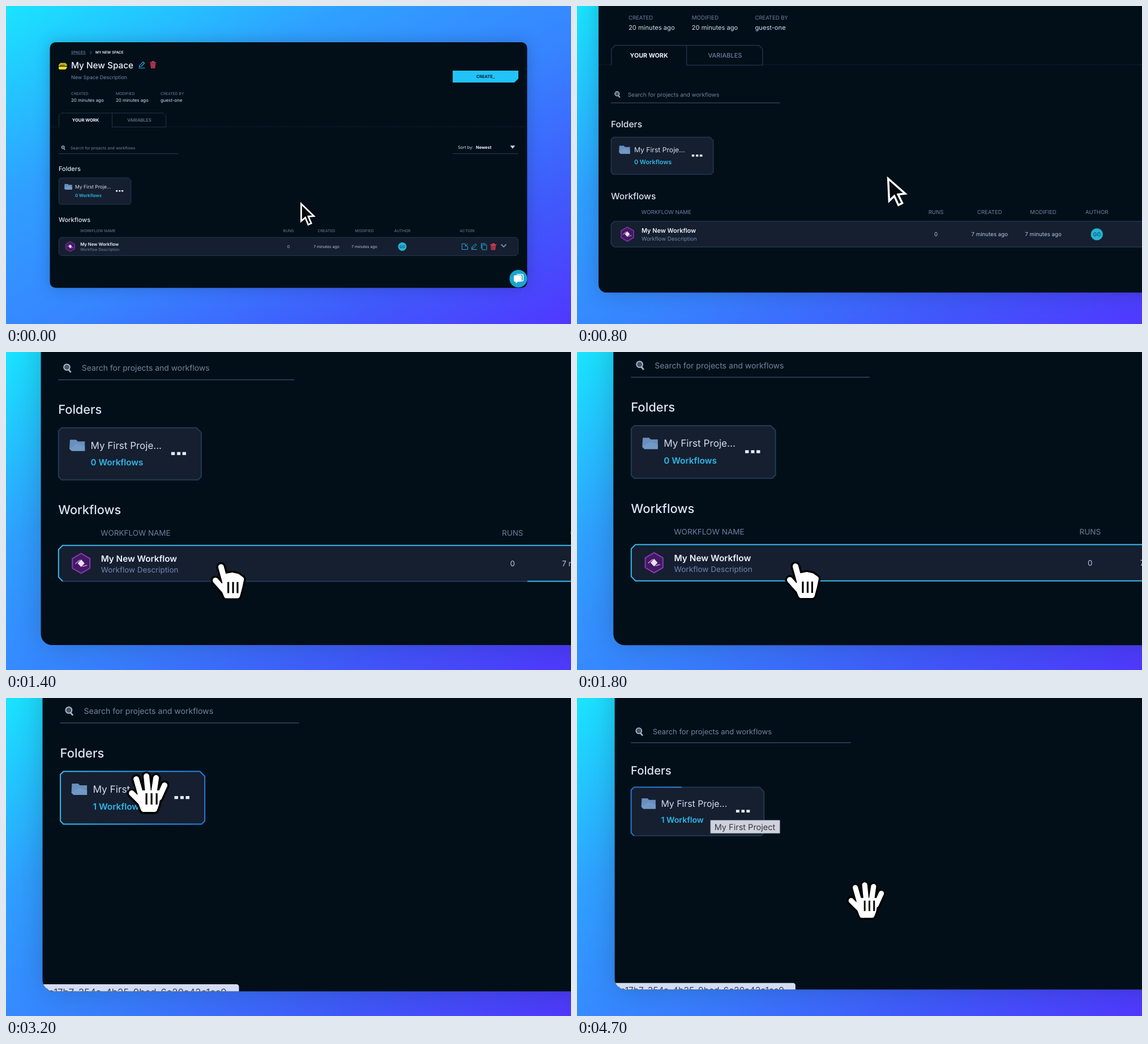
Write an HTML page that moves like this. It is 998x561 px and loops after 4800 ms.

```html
<!DOCTYPE html>
<html lang="en">
<head>
<meta charset="utf-8">
<title>Move a workflow into a folder</title>
<style>
  html, body { margin: 0; width: 100%; height: 100%; overflow: hidden; background: #3784ff; }
  svg { display: block; width: 100%; height: 100%; }
  text { font-family: Inter, "Open Sans", sans-serif; text-rendering: geometricPrecision; }
  .line { fill: none; stroke-linecap: round; stroke-linejoin: round; }
  .hand path { fill: #fff; stroke: #fff; stroke-width: 10; stroke-linecap: round; stroke-linejoin: round; }
  .hand path.rim { fill: #000; stroke: #000; stroke-width: 17; }
  .hand path.folds { stroke: #000; stroke-width: 3.2; stroke-linecap: butt; }
</style>
</head>
<body>
<svg viewBox="0 0 998 561">
  <defs>
    <linearGradient id="sky" x2="1" y2="1">
      <stop stop-color="#1ae4ff"/>
      <stop offset=".3" stop-color="#2fa0ff"/>
      <stop offset=".55" stop-color="#3784ff"/>
      <stop offset=".8" stop-color="#4058fb"/>
      <stop offset="1" stop-color="#5038ff"/>
    </linearGradient>
    <linearGradient id="glow">
      <stop stop-color="#2fb9ea"/>
      <stop offset="1" stop-color="#2277dd"/>
    </linearGradient>
    <filter id="soft" x="-10%" y="-15%" width="120%" height="130%"><feGaussianBlur stdDeviation="14"/></filter>
    <clipPath id="panelClip"><rect x="77.5" y="64" width="843" height="433.2" rx="10"/></clipPath>
    <g id="pencil" class="line" stroke="#28b4ee">
      <path d="M1 8.5 2 6 7.5.5 9.5 2.5 4 8Z M1 10.5H10"/>
    </g>
    <g id="trash" class="line" stroke="#d5405a">
      <path d="M0 2H10 M3.5 2V.5H6.5V2" stroke-width="1.3"/>
      <path d="M1.3 3.5H8.7L8 11H2Z" fill="#8f2c42"/>
      <path d="M3.6 5 6.4 9.4 M6.4 5 3.6 9.4" stroke-width=".8"/>
    </g>
  </defs>
  <rect width="998" height="561" fill="url(#sky)"/>
  <g id="camera">
    <rect x="77.5" y="64" width="843" height="433.2" rx="10" opacity=".2" filter="url(#soft)"/>
    <rect x="77.5" y="64" width="843" height="433.2" rx="10" fill="#030f18"/>
    <g id="page"></g>
    <g id="list">
      <path id="row" d="M97 440.3 93.3 436.5V412L97 408.3H901L904.7 412V436.5L901 440.3Z" fill="#151f2f" stroke="#233b58"/>
      <path id="rowGlow" d="M97 440.3 93.3 436.5V412L97 408.3H901L904.7 412V436.5L901 440.3Z" fill="none" stroke="#35b4ea" pathLength="1"/>
      <path d="M113.5 415.5 121.3 420V428.7L113.5 433.2 105.7 428.7V420Z" fill="#411a63" stroke="#8a38b4"/>
      <path d="M113.5 420.8 116.6 424.3 113.5 427.6 110.4 424.3Z" fill="#f1dcfa"/>
      <path class="line" d="M108.5 424.5 112 421.5 M115 427 118.5 426" stroke="#c98be0" stroke-width=".8"/>
      <circle cx="700" cy="424.5" r="7.5" fill="#25b2d3"/>
      <g class="line" stroke="#2ba4dc">
        <path d="M811 419.5H805.5V429.5H815.5V424 M811.5 423.5 815.5 419.5 M811.5 420.5V423.5H814.5"/>
        <path d="M841.5 421.5H849V430H841.5Z M839.5 427.5V419H847"/>
      </g>
      <use href="#pencil" x="821.5" y="419"/>
      <use href="#trash" x="855.8" y="419"/>
      <path class="line" d="M875 421 879 425 883 421" stroke="#7389a8" stroke-width="1.8"/>
    </g>
    <path d="M96 349.8 93.3 347V306L96 303.3H216.5L220.8 307.6V347L218 349.8Z" fill="#151f2f" stroke="#233b58"/>
    <path id="cardGlow" d="M96 349.8 93.3 347V306L96 303.3H216.5L220.8 307.6V347L218 349.8Z" fill="none" stroke="url(#glow)" pathLength="1"/>
    <path d="M103.5 314H109L110.5 315.5H116.8V324H105L103 322Z" fill="#688fbe"/>
    <path d="M103 322 110 317.5 116.8 320V324H105Z" fill="#7299c6"/>
    <path d="M194 325h3.2v2.6h-3.2z M199.2 325h3v2.6h-3z M204 325h3.2v2.6h-3.2z" fill="#e6eefb"/>
    <g id="card"></g>
    <g id="hint">
      <rect x="169.5" y="335" width="66.5" height="12.5" fill="#cfd2dc" stroke="#8b8f9a" stroke-width=".4"/>
    </g>
    <g id="status" clip-path="url(#panelClip)">
      <path d="M77 491H248.5Q251 491 251 493.5V500H77Z" fill="#d4dcf3"/>
    </g>
    <g id="ghost" opacity=".45"></g>
    <circle cx="905" cy="481" r="15.6" fill="#19a5ce"/>
    <path d="M902 473.5H911Q913.5 473.5 913.5 476V483Q913.5 485 911 485.5" fill="none" stroke="#fff" stroke-width="1.6"/>
    <path d="M899.5 475H908.5Q911 475 911 477.5V484Q911 486.5 908.5 486.5H904L900.5 489.5V486.5H899.5Q897 486.5 897 484V477.5Q897 475 899.5 475Z" fill="#fff"/>
  </g>
  <g id="arrow">
    <path d="M1.4 4V34.5L8.7 28.2 13.8 40.8 19.2 38.4 14 26.3 23.8 25.6Z" fill="#05080d" stroke="#fff" stroke-width="2.7"/>
  </g>
  <g id="point" class="hand"></g>
  <g id="open" class="hand"></g>
</svg>
<script>
const $ = id => document.getElementById(id);
const add = (id, markup) => $(id).insertAdjacentHTML('beforeend', markup);

// x, vertical middle, text, size, colour, weight, anchor
const label = (x, y, s, size, fill = '#d3def0', weight = 400, anchor = 'start') =>
  `<text x="${x}" y="${y}" dy=".36em" font-size="${size}" fill="${fill}" font-weight="${weight}" text-anchor="${anchor}">${s}</text>`;
const MUTED = '#6d7fa3', BLUE = '#7088b4', CYAN = '#2fb8ea', WHITE = '#eef4ff';

add('page', `
  <path d="M93 104 96 100.5H105L107.5 103V106H93Z" fill="#c9b917"/>
  <path d="M93 107H107.5V109L105 112H94.5L93 110.5Z" fill="#f0dc2a"/>
  <path d="M95.5 104.5H104" stroke="#30300f"/>
  <path class="line" d="M148.8 80 151 82.2 148.8 84.4" stroke="${BLUE}" stroke-width=".9"/>
  <path d="M115 85.3H141" stroke="${BLUE}" stroke-width=".6"/>
  <use href="#pencil" transform="translate(234 98) scale(1.1)"/>
  <use href="#trash" transform="translate(254.3 97.5) scale(1.06)"/>
  <path d="M789 114H905V128L898 135H789Z" fill="#22c3f8"/>
  <path d="M93.5 213.5V193.5L98 188.8H187.5V213.5H282.5V193.5L278 188.8H187.5" fill="none" stroke="#20334d"/>
  <path d="M78 213H93.5 M283 213H920" stroke="#162638" stroke-width=".8" stroke-dasharray="2 1"/>
  <path d="M93 260.5H304 M789 260.5H905" stroke="#354660" stroke-width=".8"/>
  <circle cx="100.7" cy="249.2" r="2.7" fill="#48566c" stroke="#a9b6ca"/>
  <path d="M102.3 251.4 104.3 253.8" stroke="#a9b6ca" stroke-width="1.4"/>
  <path d="M890.5 246.2H899.3L894.9 251.8Z" fill="#c5d3e8"/>` +
  label(115, 82, 'SPACES', 6.6, BLUE, 500) +
  label(158, 82, 'MY NEW SPACE', 6.4, WHITE, 600) +
  label(115, 104.3, 'My New Space', 15.3, WHITE, 500) +
  label(115, 126, 'New Space Description', 8.95, BLUE) +
  label(115, 154.3, 'CREATED', 6.7, MUTED) +
  label(194, 154.3, 'MODIFIED', 6.9, MUTED) +
  label(273, 154.3, 'CREATED BY', 6.7, MUTED) +
  label(115, 166.3, '20 minutes ago', 7.9) +
  label(194, 166.3, '20 minutes ago', 7.9) +
  label(273, 166.3, 'guest-one', 7.9) +
  label(847, 124.6, 'CREATE_', 7.4, '#06202f', 700, 'middle') +
  label(140.5, 201, 'YOUR WORK', 7.6, WHITE, 700, 'middle') +
  label(235.5, 201, 'VARIABLES', 7.8, MUTED, 500, 'middle') +
  label(114, 250, 'Search for projects and workflows', 7.05, '#74839f') +
  label(798, 249.5, 'Sort by:', 7.5) +
  label(830, 249.5, 'Newest', 7.4, WHITE, 700) +
  label(93, 287, 'Folders', 11, '#dbe5f5', 500));

const heads = [[499, 'RUNS'], [566, 'CREATED'], [633, 'MODIFIED'], [700, 'AUTHOR'], [814.5, 'ACTION']];
add('list',
  label(93, 376.6, 'Workflows', 11, '#dbe5f5', 500) +
  label(131, 397, 'WORKFLOW NAME', 6.8, MUTED) +
  heads.map(([x, s]) => label(x, 397, s, 6.8, MUTED, 400, 'middle')).join('') +
  label(131.2, 420, 'My New Workflow', 7.7, WHITE, 600) +
  label(131.2, 430, 'Workflow Description', 6.8, BLUE) +
  label(499, 424.5, '0', 6.8, '#b9c6da', 400, 'middle') +
  label(566, 424.5, '7 minutes ago', 6.9, '#b9c6da', 400, 'middle') +
  label(633, 424.5, '7 minutes ago', 6.9, '#b9c6da', 400, 'middle') +
  label(700, 424.5, 'GO', 6.4, '#0d4c60', 500, 'middle'));

add('card',
  label(122, 319, 'My First Proje...', 8.6) +
  label(122, 334.3, '', 7.7, CYAN, 600));
const count = $('card').lastElementChild;

add('hint', label(173.2, 341.6, 'My First Project', 7.9, '#33363e'));
add('status', label(78, 498, '5a17b7-354a-4b25-9bed-6c20a42c1cc9', 8.4, '#3b4152'));
add('ghost', label(-36.5, 18.7, 'My New Workflow', 7.8, '#cdd6e6'));

const hand = (id, x, y, shape, folds) => add(id, `<g transform="translate(${-x} ${-y})">
  <path class="rim" d="${shape}"/><path d="${shape}"/><path class="folds" d="${folds}"/></g>`);
hand('point', 384, 374,
  'M385 379 393 408Z M375 403 390 420Z M395 396 405 394 414 396 421 401 418 415 414 430H395L390 418Z',
  'M398 406V426 M406.5 406V426 M414.5 406V426');
hand('open', 254, 171,
  'M233 147 241 175Z M251 142 254 172Z M268 145 264 172Z M283 158 273 180Z M225 172 243 190Z M240 172H272L268 192 265 200H246L242 190Z',
  'M251 172V192 M260 172V192 M269 172V192');

const mix = (a, b, p) => a + (b - a) * p;
const ramp = (t, a, b) => Math.min(1, Math.max(0, (t - a) / (b - a)));
const ease = (t, a, b) => { const u = ramp(t, a, b); return u * u * (3 - 2 * u); };
const spring = ms => { const x = Math.max(0, ms) * .00705; return 1 - (1 + x) * Math.exp(-x); };
const show = (id, on) => $(id).style.display = on ? '' : 'none';
const place = (id, x, y, k, turn = 0) =>
  $(id).setAttribute('transform', `translate(${x} ${y}) rotate(${turn}) scale(${k})`);
const trace = (id, length, opacity) => {
  $(id).setAttribute('stroke-dasharray', length >= 1 ? 'none' : `${length} 2`);
  $(id).setAttribute('opacity', length > 0 ? opacity : 0);
};

function draw(t) {
  const zoomIn = spring(t - 600);
  const zoom = 1 + zoomIn - spring(t - 4600);
  const camX = -mix(231, 90.5, zoomIn) * (zoom - 1);
  const camY = -477 * (zoom - 1);
  place('camera', camX, camY, zoom);

  // pointer position in page units
  let x = mix(520, 238, ease(t, 600, 1163));
  let y = mix(345, 425, ease(t, 700, 1280));
  const drag = ease(t, 1930, 2490), rest = ease(t, 2490, 2750), leave = ease(t, 4350, 4750);
  x = mix(mix(mix(x, 172.3, drag), 170.8, rest), 325.4, leave);
  y = mix(mix(mix(y, 324, drag), 322, rest), 415.4, leave);

  const px = x * zoom + camX, py = y * zoom + camY;
  place('arrow', px, py, 1 + .7 * (zoom - 1), -4 * ease(t, 650, 900));
  place('point', px, py, zoom / 2);
  place('open', px, py, zoom / 2);
  place('ghost', x, y, 1);
  show('arrow', t < 1100);
  show('point', t >= 1100 && t < 2000);
  show('open', t >= 2000);
  show('ghost', t >= 2000 && t < 2600);

  const dropped = t >= 2800;
  show('list', !dropped);
  count.textContent = dropped ? '1 Workflow' : '0 Workflows';
  show('status', t >= 2900);
  show('hint', t >= 4000);
  trace('rowGlow', ramp(t, 1100, 1500), 1 - ramp(t, 1900, 2100));
  trace('cardGlow', 1 - ramp(t, 4500, 4778), ramp(t, 2300, 2700));
  $('glow').setAttribute('gradientTransform', `rotate(${180 * ramp(t, 4500, 4700)} .5 .5)`);
}

const begin = performance.now();
(function tick() {
  draw((performance.now() - begin) % 4800);
  requestAnimationFrame(tick);
})();
</script>
</body>
</html>
```
